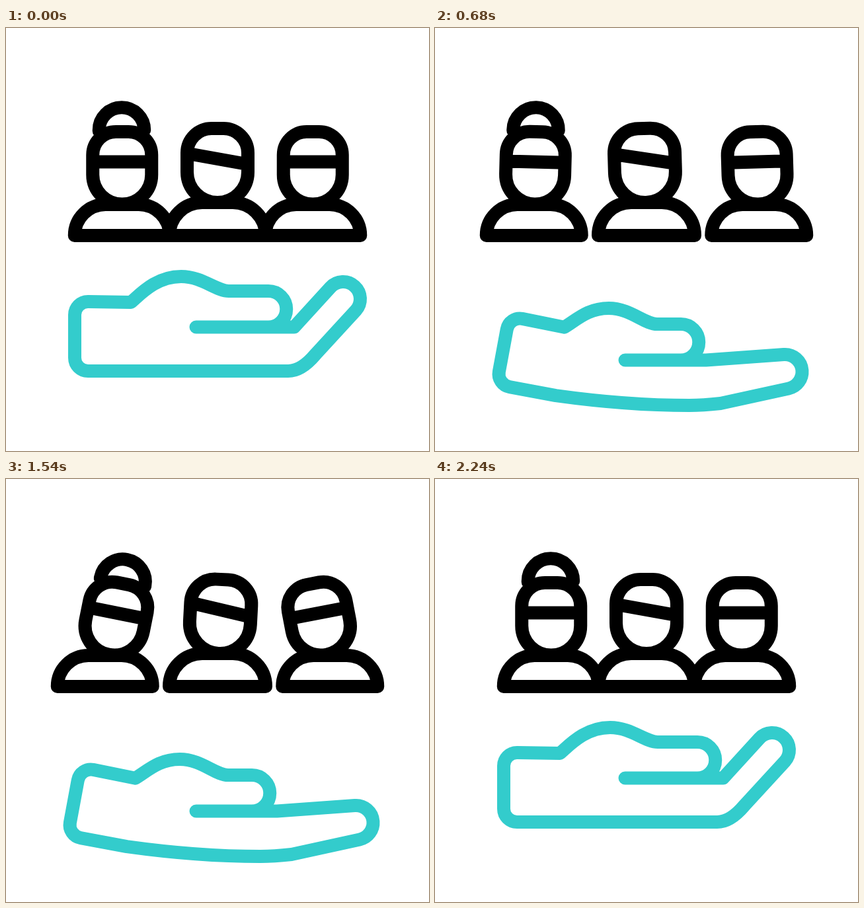
These frames come from a looping animation (640x640 px, 2.4 s). An HTML page with a canvas:

```html
<!DOCTYPE html>
<html lang="en">
<head>
<meta charset="utf-8">
<title>People above a caring hand</title>
<style>
html, body { margin: 0; width: 100%; height: 100%; overflow: hidden; background: #fff; }
canvas { display: block; width: 100%; height: 100%; }
</style>
</head>
<body>
<canvas id="stage" width="640" height="640"></canvas>
<script>
const LOOP = 2400;
const { PI, sin, cos, atan2, asin, hypot } = Math;
const ctx = document.getElementById('stage').getContext('2d');
ctx.lineWidth = 20;
ctx.lineJoin = ctx.lineCap = 'round';

// turn: degrees leaned to first; swing: degrees swayed back from there
const people = [
  { x: 175.75, shift: -26, turn: 11.3, swing: 0, bun: true },
  { x: 320, shift: 0, turn: -13, swing: 26, tall: true },
  { x: 464.25, shift: 26, turn: -13.6, swing: 4.4 }
];

const ramp = (t, from, to) => Math.min(1, Math.max(0, (t - from) / (to - from)));

// Dome: two rounded top corners between half-widths, open below
function dome(half, top, r) {
  ctx.arc(r - half, top + r, r, PI, 1.5 * PI);
  ctx.arc(half - r, top + r, r, 1.5 * PI, 2 * PI);
}

function drawBody(tall) {
  ctx.beginPath();
  if (tall) dome(73, 264, 50);
  else dome(72, 267, 47);
  ctx.closePath();
  ctx.stroke();
}

function drawHead({ tall, bun }, tilt) {
  const half = tall ? 46 : 44.5;
  const chin = tall ? 218 : 222;
  const fringe = tall ? 198 : 202.5;
  const slant = tall ? 8.25 : 0;

  // The head leans about its chin while sliding the same way
  ctx.translate(1.27 * tilt, chin);
  ctx.rotate(tilt * PI / 180);
  ctx.translate(0, -chin);

  ctx.beginPath();
  ctx.arc(0, chin, half, 0, PI);
  if (tall) dome(half, 152, 37);
  else dome(half, 157, 35);
  ctx.closePath();
  ctx.moveTo(-half, fringe - slant);
  ctx.lineTo(half, fringe + slant);
  if (bun) {
    ctx.moveTo(-35, 156);
    ctx.arc(-0.75, 154.5, 34.25, PI, 2 * PI);
  }
  ctx.stroke();
}

function drawPerson(person, open, tilt) {
  ctx.save();
  ctx.translate(person.x + person.shift * open, 0);
  drawBody(person.tall);
  drawHead(person, tilt);
  ctx.restore();
}

// The wrist turns as one piece, the thumb sinks, the fingers unfold
function drawHand(p) {
  const angle = p * 10.5 * PI / 180;
  const wrist = (x, y) => {
    const dx = x - 124, dy = y - 466.5;
    return [
      124 - 1.5 * p + dx * cos(angle) - dy * sin(angle),
      466.5 + 25 * p + dx * sin(angle) + dy * cos(angle)
    ];
  };
  const sink = 50 * p;
  const root = [436 - 26 * p, 452.5 + sink];
  const tip = [510 + 19.5 * p, 410 + 110 * p];
  const knuckle = [468 - 36 * p, 494 + 74 * p];
  const heel = [427 - 42 * p, 519 + 52 * p];
  const r = 26;
  // Angle of the circle point where a line from `from` touches the fingertip
  const touch = (from, side) => {
    const dx = tip[0] - from[0], dy = tip[1] - from[1];
    return atan2(dy, dx) + side * (asin(r / hypot(dx, dy)) + PI / 2);
  };

  ctx.beginPath();
  ctx.moveTo(287.5, root[1]);
  ctx.lineTo(...root);
  ctx.arc(...tip, r, touch(root, -1), touch(knuckle, 1));
  ctx.lineTo(...knuckle);
  ctx.quadraticCurveTo(heel[0] + 20, heel[1], ...heel);
  ctx.quadraticCurveTo(290, heel[1], ...wrist(195, 519));
  ctx.arc(...wrist(124, 499), 20, PI / 2 + angle, PI + angle);
  ctx.arc(...wrist(124, 434), 20, PI + angle, 1.5 * PI + angle);
  ctx.lineTo(...wrist(189, 415));
  ctx.bezierCurveTo(...wrist(205, 401), 228 + 3 * p, 376 + 48 * p, 265 - 2 * p, 376 + 48 * p);
  ctx.bezierCurveTo(297 - 2 * p, 376 + 48 * p, 318 - p, 398 + sink, 337 - p, 398 + sink);
  ctx.arc(397 - 25 * p, 425.25 + sink, 27.25, -PI / 2, PI / 2);
  ctx.stroke();
}

function draw(t) {
  const back = ramp(t, 1800, 2240);
  const open = ramp(t, 200, 640) - back;
  const lean = ramp(t, 640, 960) - back;
  const sway = ramp(t, 960, 1380) - ramp(t, 1380, 1800);

  ctx.fillStyle = '#fff';
  ctx.fillRect(0, 0, 640, 640);
  ctx.strokeStyle = '#000';
  for (const person of people) {
    drawPerson(person, open, person.turn * lean + person.swing * sway);
  }
  ctx.strokeStyle = '#33cccc';
  drawHand(open);
}

const start = performance.now();
function tick() {
  draw((performance.now() - start) % LOOP);
  requestAnimationFrame(tick);
}
tick();
</script>
</body>
</html>
```
